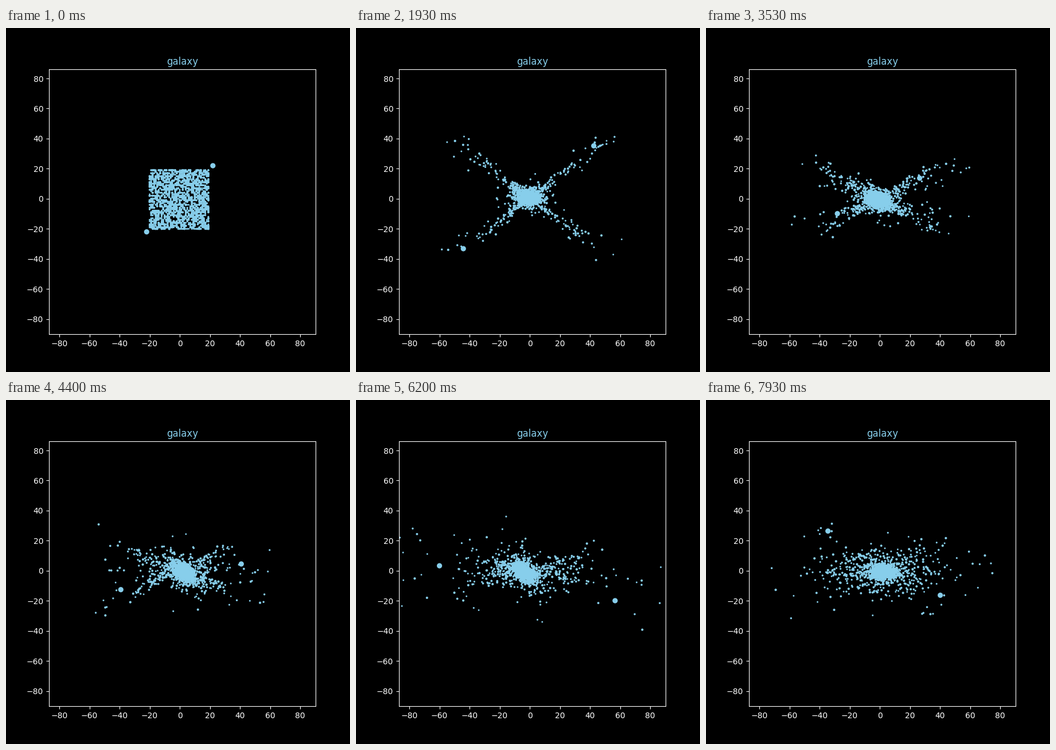
These frames come from a looping animation (600 px wide and 600 px high, 8 s). A matplotlib script:

```python
import numpy as np
import matplotlib.pyplot as plt
from matplotlib.animation import FuncAnimation

FRAMES = 120
LOOP_MS = 8000
COLLAPSE = 12                        # frame at which the square has fallen in
CROSSINGS = [COLLAPSE, 57, 109, 165]  # frames at which the bodies pass the centre
N, N_THROWN, N_HALO = 1700, 330, 330

rng = np.random.default_rng(12)


def unit(angle):
    return np.column_stack([np.cos(angle), np.sin(angle)])


def fall(t):
    """Free fall from rest: 1 at the start, 0 at the collapse."""
    return np.cos(np.pi / 2 * min(t / COLLAPSE, 1))


class Pendulums:
    """Stars that fall through the centre and swing along slowly turning lines.

    A star of low energy swings shorter and faster."""

    def __init__(self, start, energy, turn, angle, stretch=1.0):
        self.start = start
        self.energy = energy
        self.turn = turn
        self.angle = angle
        self.stretch = stretch
        self.side = -np.sign(start[:, 0])

    def at(self, t):
        if t < COLLAPSE:
            return self.start * fall(t)
        phase = np.interp(t, CROSSINGS, range(len(CROSSINGS)))
        wave = np.sin(np.pi * phase / self.energy)
        reach = (57 + 7 * phase) * self.energy * self.stretch
        r = self.side * reach * np.sign(wave) * np.abs(wave) ** 0.7
        return r[:, None] * unit(self.angle * np.cos(np.pi * t / self.turn))


class Swarm:
    """Stars that fall in and then circle inside a swaying, tilting ellipse."""

    def __init__(self, start, rho, size, spin):
        n = len(start)
        self.start, self.rho, self.size = start, rho, size
        self.phase = rng.uniform(0, 2 * np.pi, n)
        self.spin = rng.uniform(*spin, n)

    def at(self, t):
        grown = np.clip((t - COLLAPSE) / 27, 0, 1)
        sway = 3 * np.cos(2 * np.pi * (t - 66) / 52) - 0.5
        tilt = np.radians(-45) * np.sin(np.pi * max(t - 39, 0) / 82)
        centre = np.array([sway, 3.5 - 4.5 * grown])
        c, s = np.cos(tilt), np.sin(tilt)
        ring = self.rho[:, None] * unit(self.phase + self.spin * t) * self.size(t, grown)
        orbit = centre + ring @ np.array([[c, s], [-s, c]])
        return self.start * fall(t) + orbit * (1 - fall(t))


def halo_size(t, grown):
    return 3 + 5 * grown + max(t - 39, 0) / 60, 3 + grown + max(t - 39, 0) / 30


def core_size(t, grown):
    return 2.3 + 1.5 * grown, 2.3


def thrown_stars(start):
    """Corner stars, gathered in clumps that share energy and turning."""
    n, clumps = len(start), 60
    pick = rng.integers(0, clumps, n)
    energy = 0.22 + rng.gamma(2, 0.15, clumps)[pick] + rng.normal(0, 0.025, n)
    turn = rng.uniform(130, 260, clumps)[pick] + rng.normal(0, 8, n)
    slope = np.degrees(np.arctan(start[:, 1] / start[:, 0]))
    arm = np.copysign(41, slope) + 0.4 * (slope - np.copysign(45, slope))
    return Pendulums(start, np.clip(energy, 0.18, 1.15), turn, np.radians(arm),
                     rng.uniform(0.85, 1.2, n))


# the starting square, corners first
square = rng.integers(-20, 20, (N, 2)) + 0.0
square = square[np.argsort(-np.hypot(*(square + 0.5).T))]
corners, middle, inside = np.split(square, [N_THROWN, N_THROWN + N_HALO])

groups = [
    thrown_stars(corners),
    Swarm(middle, rng.gamma(3, 0.45, len(middle)), halo_size, (-0.12, -0.03)),
    Swarm(inside, rng.rayleigh(1, len(inside)), core_size, (-0.2, -0.08)),
    Pendulums(np.array([[22.0, 22.0], [-22.0, -22.0]]), np.ones(2),
              np.array([145, 178]), np.radians(45)),
]


def stars_at(t):
    return np.concatenate([g.at(t) for g in groups])


fig = plt.figure(figsize=(6, 6), dpi=100, facecolor="black")
ax = fig.add_axes([0.125, 0.11, 0.775, 0.77], facecolor="black")
ax.set_xlim(-86.86, 90.24)
ax.set_ylim(-90.05, 86.12)
ax.set_xticks(range(-80, 81, 20))
ax.set_yticks(range(-80, 81, 20))
ax.tick_params(colors="white")
for spine in ax.spines.values():
    spine.set_color("white")
ax.set_title("galaxy", color="skyblue")

first = stars_at(0)
width = rng.uniform(2.8, 4.2, len(first))
width[-2:] = 9.2                     # the two heavy bodies
dots = ax.scatter(*first.T, s=(0.72 * width) ** 2, color="skyblue", linewidths=0)


def update(frame):
    dots.set_offsets(stars_at(frame))
    return (dots,)


anim = FuncAnimation(fig, update, frames=FRAMES, interval=LOOP_MS / FRAMES,
                     repeat=True, repeat_delay=0)
plt.show()
```
